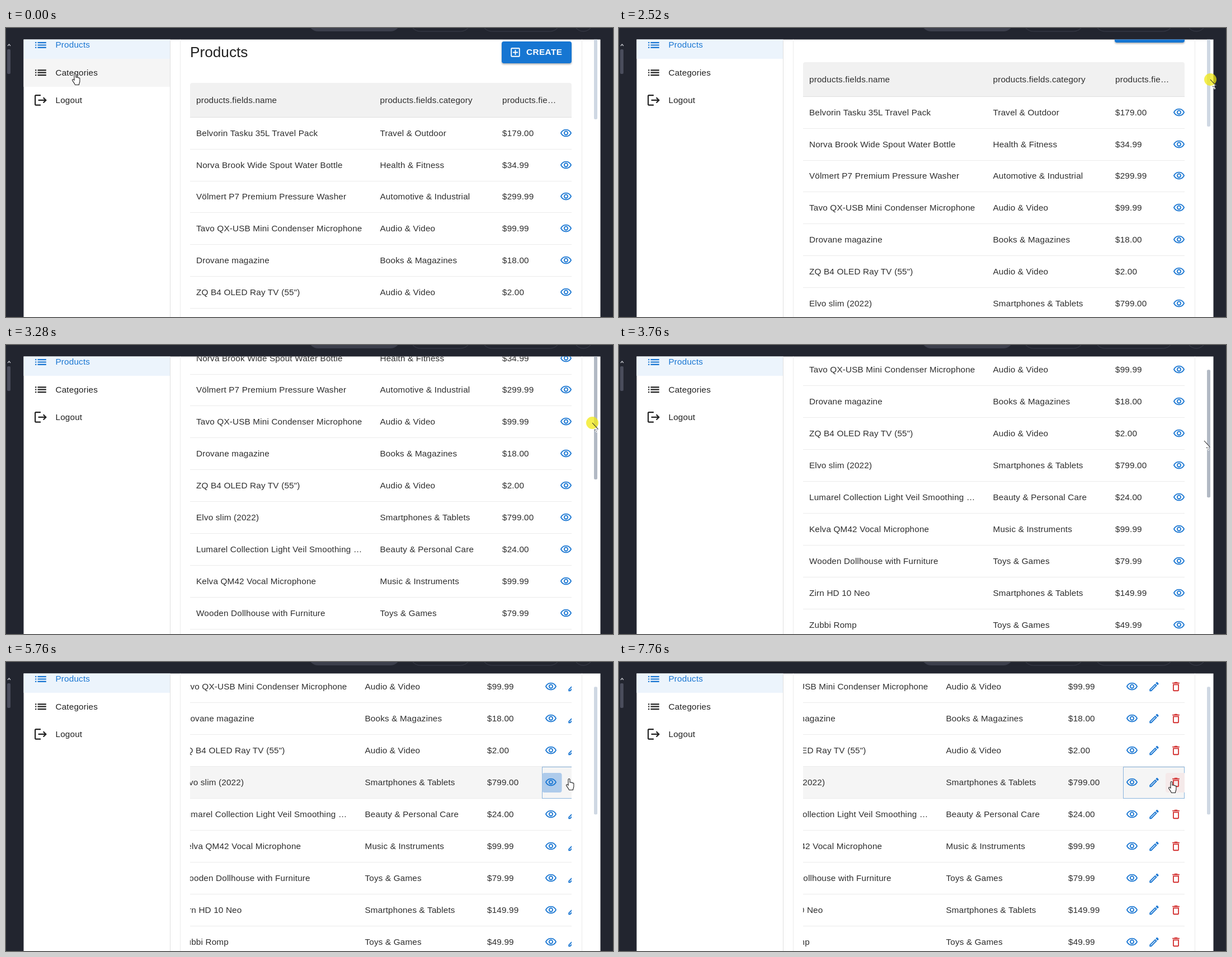
These frames come from a looping animation (1085x516 px, 8000 ms). An HTML page:

```html
<!DOCTYPE html>
<html lang="en">
<head>
<meta charset="utf-8">
<title>Products table</title>
<style>
  html, body { margin: 0; width: 100%; height: 100%; overflow: hidden; background: #22252f; }
  svg { display: block; width: 1085px; height: 516px; }
  text { font: 15.29px "Liberation Sans", Arial, sans-serif; letter-spacing: .01071em; fill: #2e2e2e; white-space: pre; }
  .title { font-size: 26.2px; letter-spacing: 0; fill: #212121; }
  .button { font-weight: 600; letter-spacing: .02857em; fill: #fff; }
  .blue { fill: #1976d2; }
  .red { fill: #d32f2f; }
  .white { fill: #fff; }
  .ink { fill: #212121; }
</style>
</head>
<body>
<svg viewBox="0 0 1085 516">
  <defs>
    <clipPath id="page"><rect x="31.500" y="20.500" width="1031" height="496"/></clipPath>
    <clipPath id="grid"><rect x="329" y="0" width="682" height="1000"/></clipPath>
    <filter id="shadow" x="-10%" y="-20%" width="120%" height="150%">
      <feDropShadow dx="0" dy="2" stdDeviation="1.6" flood-opacity=".3"/>
    </filter>
    <path id="list" d="M3 13h2v-2H3zm0 4h2v-2H3zm0-8h2V7H3zm4 4h14v-2H7zm0 4h14v-2H7zM7 7v2h14V7z"/>
    <path id="logout" d="m17 7-1.41 1.41L18.17 11H8v2h10.17l-2.58 2.58L17 17l5-5zM4 5h8V3H4c-1.1 0-2 .9-2 2v14c0 1.1.9 2 2 2h8v-2H4z"/>
    <path id="add" d="M19 3H5c-1.11 0-2 .9-2 2v14c0 1.1.89 2 2 2h14c1.1 0 2-.9 2-2V5c0-1.1-.9-2-2-2zm0 16H5V5h14v14zm-8-2h2v-4h4v-2h-4V7h-2v4H7v2h4z"/>
    <path id="eye" d="M12 6c3.79 0 7.17 2.13 8.82 5.5C19.17 14.87 15.79 17 12 17s-7.17-2.13-8.82-5.5C4.83 8.13 8.21 6 12 6m0-2C7 4 2.73 7.11 1 11.5 2.73 15.89 7 19 12 19s9.27-3.11 11-7.5C21.27 7.11 17 4 12 4zm0 5c1.38 0 2.5 1.12 2.5 2.5S13.38 14 12 14s-2.5-1.12-2.5-2.5S10.62 9 12 9m0-2c-2.48 0-4.5 2.02-4.5 4.5S9.52 16 12 16s4.5-2.02 4.5-4.5S14.48 7 12 7z"/>
    <path id="pencil" d="M14.06 9.02l.92.92L5.92 19H5v-.92l9.06-9.06M17.66 3c-.25 0-.51.1-.7.29l-1.83 1.83 3.75 3.75 1.83-1.83c.39-.39.39-1.02 0-1.41l-2.34-2.34c-.2-.2-.45-.29-.71-.29zm-3.6 3.19L3 17.25V21h3.75L17.81 9.94l-3.75-3.75z"/>
    <path id="trash" d="M6 19c0 1.1.9 2 2 2h8c1.1 0 2-.9 2-2V7H6v12zM8 9h8v10H8V9zm7.5-5l-1-1h-5l-1 1H5v2h14V4h-3.5z"/>
  </defs>

  <!-- surrounding window -->
  <rect width="1085" height="516" fill="#22252f"/>
  <rect x="540" y="-30" width="165" height="36" rx="18" fill="#3c3f4c"/>
  <g fill="none" stroke="#3c3f4c">
    <rect x="722.500" y="-30" width="108" height="36" rx="18"/>
    <rect x="850.500" y="-30" width="140" height="36" rx="18"/>
    <circle cx="1032" cy="-11" r="17"/>
  </g>
  <path d="M3 32l2.500-3 2.500 3" fill="none" stroke="#c4c6cc" stroke-width="1.300"/>
  <rect x="2" y="38" width="6" height="44" rx="2" fill="#4a4d5c"/>

  <g clip-path="url(#page)">
    <rect x="31" y="20" width="1032" height="496" fill="#fff"/>
    <rect x="31" y="20" width="262" height="35" fill="#ecf4fc"/>
    <rect id="navHover" x="31" y="55" width="262" height="50" fill="#f5f5f5"/>
    <g id="nav"></g>
    <path d="M293.500 20V516" stroke="#e0e0e0"/>
    <path d="M311.500 20V516M1029.500 20V516" stroke="#ebebeb"/>
    <g id="content">
      <text class="title" x="329" y="52">Products</text>
      <rect class="blue" x="886" y="24" width="125" height="39" rx="4" filter="url(#shadow)"/>
      <g id="create"></g>
      <g clip-path="url(#grid)"><g id="table"></g></g>
    </g>
    <rect id="thumb" x="1051" width="6" height="228" rx="2"/>
  </g>

  <g id="arrow">
    <path d="M0 0V15L4 11.500 7 17.500 9.500 16.500 6.500 11H11Z" fill="#fff"/>
    <circle id="press" r="11" fill="#f2ea10" opacity=".74"/>
    <path d="M0 0L10.500 11.500M4 12l2 1M7 15l1 .500" fill="none" stroke="#222" stroke-width="1.100"/>
  </g>
  <path id="hand" fill="#fff" stroke="#222" stroke-width="1.100" d="M4 12V2a1.500 1.500 0 0 1 3 0v5.500c0-1 2.600-1 2.600.300 0-.800 2.300-.800 2.300.600 0-.700 2-.500 2 .800V14c0 3-1.500 4-1.500 6.500H5.500C5 18 1 14 .600 12.300 .300 10.600 2 10 4 12Z"/>
</svg>

<script>
const LOOP = 8000;
const $ = id => document.getElementById(id);
const text = (x, y, label, attrs = '') => `<text x="${x}" y="${y}" ${attrs}>${label}</text>`;
const icon = (name, x, y, size, cls) =>
  `<use href="#${name}" class="${cls}" transform="translate(${x - size / 2} ${y - size / 2}) scale(${size / 24})"/>`;

const products = [
  ['Belvorin Tasku 35L Travel Pack', 'Travel & Outdoor', '179.00'],
  ['Norva Brook Wide Spout Water Bottle', 'Health & Fitness', '34.99'],
  ['Völmert P7 Premium Pressure Washer', 'Automotive & Industrial', '299.99'],
  ['Tavo QX-USB Mini Condenser Microphone', 'Audio & Video', '99.99'],
  ['Drovane magazine', 'Books & Magazines', '18.00'],
  ['ZQ B4 OLED Ray TV (55")', 'Audio & Video', '2.00'],
  ['Elvo slim (2022)', 'Smartphones & Tablets', '799.00'],
  ['Lumarel Collection Light Veil Smoothing …', 'Beauty & Personal Care', '24.00'],
  ['Kelva QM42 Vocal Microphone', 'Music & Instruments', '99.99'],
  ['Wooden Dollhouse with Furniture', 'Toys & Games', '79.99'],
  ['Zirn HD 10 Neo', 'Smartphones & Tablets', '149.99'],
  ['Zubbi Romp', 'Toys & Games', '49.99'],
];
const ACTIVE_ROW = 6;
const columns = [340, 668.5, 887];
const rowBottom = i => Math.floor(216.15 + 56.9 * i);

function productRow([name, category, price], i) {
  const bottom = rowBottom(i), mid = bottom - 28;
  const cells = [name, category.replace('&', '&amp;'), '$' + price];
  const backdrop = i !== ACTIVE_ROW ? '' : `
    <rect id="rowHover" x="329" y="${bottom - 56}" width="900" height="56" fill="#f5f5f5"/>
    <rect id="focusRing" x="985.5" y="${bottom - 55.5}" width="109" height="56" fill="none" stroke="#8ab4dc"/>
    <rect id="eyeFocus" x="985.5" y="${mid - 17}" width="35" height="35" rx="4" fill="#aecbeb"/>
    <rect id="trashHover" x="1061" y="${mid - 17}" width="36" height="35" rx="4" fill="#f5eaea"/>`;
  return `<rect x="329" y="${bottom}" width="900" height="1" fill="#ebebeb"/>` + backdrop
    + cells.map((cell, c) => text(columns[c], bottom - 23.5, cell)).join('')
    + icon('eye', 1001, mid, 21.85, 'blue')
    + icon('pencil', 1040.5, mid, 21.85, 'blue')
    + icon('trash', 1079.5, mid, 21.85, 'red');
}

$('nav').innerHTML = [['Products', 'list', 'blue'], ['Categories', 'list', 'ink'], ['Logout', 'logout', 'ink']]
  .map(([label, glyph, cls], i) => icon(glyph, 62, 30.5 + 49.2 * i, 26.2, cls)
    + text(88.5, Math.round(35.4 + 49.2 * i), label, `class="${cls}"`)).join('');
$('create').innerHTML = icon('add', 910.5, 43.5, 21.85, 'white') + text(930, 48, 'CREATE', 'class="button"');
$('table').innerHTML = `
  <path d="M329 159V102q0-4 4-4H1007q4 0 4 4V159z" fill="#f1f1f1"/>
  <rect x="329" y="159" width="682" height="1" fill="#e0e0e0"/>`
  + text(columns[0], 134, 'products.fields.name')
  + text(columns[1], 134, 'products.fields.category', 'id="categoryHead"')
  + text(columns[2], 134, 'products.fie…')
  + `<g id="headHover">
       <path d="M657.500 121V136M876.500 121V136M986.500 121V136" stroke="#d6d6d6" stroke-width="1.500"/>
       <path d="M860 123v0M860 128.500v0M860 134v0" stroke="#666" stroke-width="3.600" stroke-linecap="round"/>
     </g>`
  + products.map(productRow).join('');

// Each step overrides part of the state from its time on.
const arrow = (x, y, more) => ({ cursor: 'arrow', x, y, ...more });
const hand = (x, y, more) => ({ cursor: 'hand', x, y, ...more });
const steps = [
  [0, hand(118, 81, { scroll: 0, shift: 0, navHover: true })],
  [240, hand(121, 82)],
  [480, hand(123, 81)],
  [760, arrow(330, 70, { navHover: false })],
  [1000, arrow(700, 130, { headHover: true })],
  [1240, arrow(896, 170)],
  [1520, arrow(1074, 62, { headHover: false })],
  [1720, arrow(847, 178)],
  [2000, arrow(1072, 60)],
  [2520, arrow(1057, 92, { scroll: 37, press: true })],
  [2760, arrow(1055, 106, { scroll: 95, dragging: true })],
  [3000, arrow(1052, 122, { scroll: 160 })],
  [3280, arrow(1048, 139, { scroll: 221 })],
  [3520, arrow(1047, 156, { scroll: 270 })],
  [3760, arrow(1046, 171, { scroll: 314, press: false })],
  [4000, arrow(1030, 195, { dragging: false })],
  [4240, hand(1012, 209, { rowHover: true })],
  [4520, hand(1009, 204)],
  [4760, hand(1004, 200)],
  [5000, hand(1001, 208)],
  [5280, hand(1042, 209)],
  [5520, hand(1001, 208, { focusRing: true, eyeFocus: true })],
  [5760, { shift: 27 }],
  [6000, { shift: 84, eyeFocus: false }],
  [7000, hand(910, 209)],
  [7280, hand(935, 211)],
  [7520, hand(953, 212)],
  [7760, hand(982, 213, { trashHover: true })],
];

const show = (id, visible) => $(id).setAttribute('visibility', visible ? 'inherit' : 'hidden');
const move = (id, x, y) => $(id).setAttribute('transform', `translate(${x} ${y})`);

function draw(time) {
  const state = Object.assign({}, ...steps.filter(([at]) => at <= time).map(([, change]) => change));
  for (const id of ['navHover', 'headHover', 'press', 'rowHover', 'focusRing', 'eyeFocus', 'trashHover']) show(id, state[id]);
  for (const id of ['arrow', 'hand']) show(id, state.cursor === id);
  // The press ring sits inside the arrow group, so it must hide with it.
  move(state.cursor, state.x, state.y);
  move('content', 0, -state.scroll);
  move('table', -state.shift, 0);
  move('thumb', 0, -65 + state.scroll * .348);
  $('thumb').setAttribute('fill', state.dragging ? '#b2b9c4' : '#cfd8e3');
  $('categoryHead').textContent = state.headHover ? 'products.fields.cat…' : 'products.fields.category';
}

const start = performance.now();
function tick() {
  draw((performance.now() - start) % LOOP);
  requestAnimationFrame(tick);
}
tick();
</script>
</body>
</html>
```
